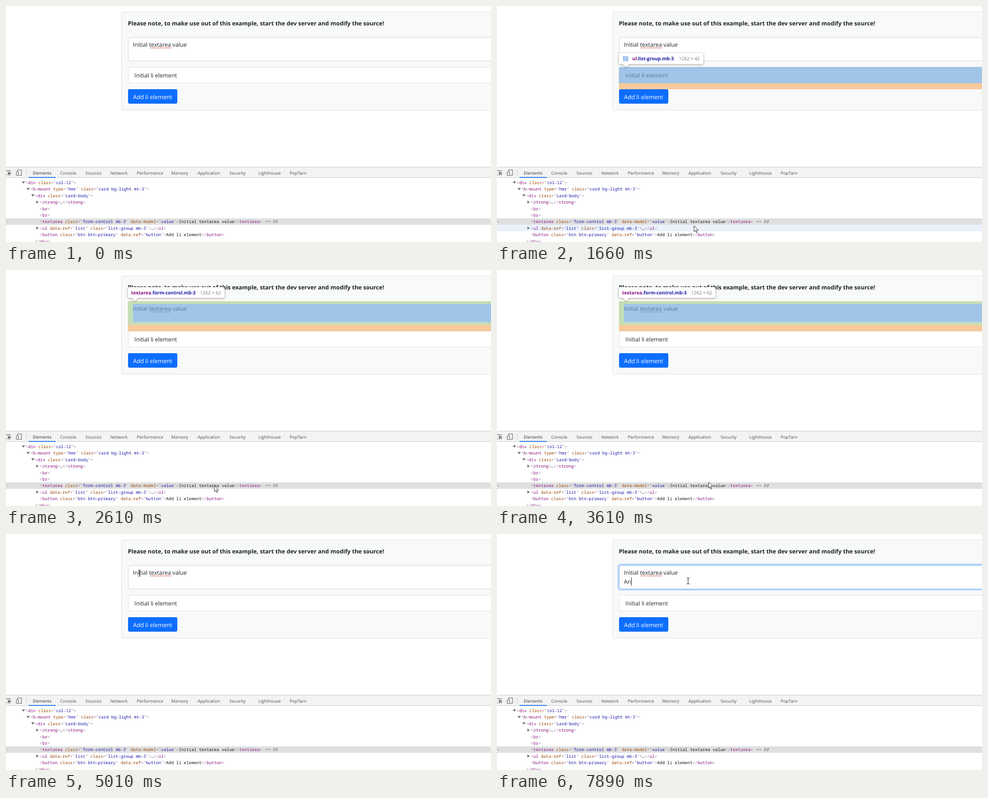
An HTML page that plays this animation: 1073x522 px, repeating every 8000 ms.

```html
<!DOCTYPE html>
<html lang="en">
<head>
<meta charset="utf-8">
<title>Live textarea editing</title>
<style>
  html, body { margin: 0; width: 100%; height: 100%; overflow: hidden; background: #fff; }
  svg { display: block; }
  text { white-space: pre; text-rendering: geometricPrecision; fill: #212529;
    font: 12.7px "Open Sans", "Noto Sans", sans-serif; }
  .head { font-size: 12.78px; font-weight: 700; }
  .btn { font-size: 12.9px; fill: #fff; }
  .tab { font-size: 9.6px; fill: #505050; }
  .tab.on { fill: #333; }
  .code { font: 500 9.32px "Noto Sans Mono", "DejaVu Sans Mono", monospace; fill: #1a1a1a; }
  .tip text { font-size: 10.2px; fill: #777; }
  .tip .sel { font-size: 10.45px; font-weight: 700; fill: #1a1aa6; }
  .tip .box { fill: #fff; filter: drop-shadow(0 1px 2px rgba(0, 0, 0, .4)); }
  .punct { fill: #95789a; }
  .tag { fill: #881280; }
  .attr { fill: #994500; }
  .val { fill: #1a1aa6; }
  .content { fill: rgba(111, 168, 220, .66); }
  .padding { fill: rgba(147, 196, 125, .55); }
  .margin { fill: rgba(246, 178, 107, .66); }
  .edge { fill: none; stroke: rgba(255, 229, 153, .66); }
</style>
</head>
<body>
<svg width="1073" height="522" viewBox="0 0 1073 522">
  <g id="page">
    <rect x="255.5" y="13.5" width="1100" height="217" rx="3.4" fill="#f8faf9" stroke="#dfdfdf"/>
    <text class="head" x="269.5" y="43">Please note, to make use out of this example, start the dev server and modify the source!</text>
    <rect id="ring" x="268.3" y="67.3" width="1100" height="55.9" rx="5" fill="none" stroke="#0d6efd" stroke-width="3.4"/>
    <rect id="area" x="270.5" y="69.5" width="1100" height="52" rx="3.4" fill="#fff" stroke="#ced4da"/>
    <text x="280.6" y="90">Initial textarea value</text>
    <path id="squiggle" fill="none" stroke="#e23c2e"/>
    <text id="typed" x="280.8" y="110.4"></text>
    <rect id="caret" width="1" height="18" fill="#111"/>
    <rect x="270.5" y="135.5" width="1100" height="35" rx="3.4" fill="#fff" stroke="#dfdfdf"/>
    <text x="284.1" y="158">Initial li element</text>
    <rect x="270" y="184" width="109" height="32" rx="3.4" fill="#0d6efd"/>
    <text class="btn" x="281" y="205.5">Add li element</text>
  </g>

  <g id="areaMark">
    <path class="padding" fill-rule="evenodd" d="M270 69H1073V121H270ZM281 75H1073V115.5H281Z"/>
    <rect class="content" x="281" y="75" width="792" height="40.5"/>
    <rect class="edge" x="270" y="69.3" width="1100" height="52"/>
    <rect class="margin" x="269.7" y="121.6" width="804" height="13.6"/>
  </g>
  <g id="listMark">
    <rect class="content" x="269.7" y="135" width="804" height="35.7"/>
    <rect class="margin" x="269.7" y="170.7" width="804" height="13.6"/>
  </g>

  <g id="devtools">
    <rect y="357" width="1073" height="23" fill="#f3f3f3"/>
    <path d="M0 356.5H1073M0 379.5H1073M45 362V376" stroke="#cacdd1"/>
    <rect x="50" y="378.3" width="60" height="1.9" fill="#1a73e8"/>
    <g fill="none" stroke="#6e6e6e" stroke-width="1.2">
      <path d="M0 364.3H9.3V367M0 373.5H3"/>
      <path d="M4 367.3L10.8 370L8 371L10.5 374.2M4 367.3L5.8 374L7.2 371.5" fill="#6e6e6e"/>
      <path d="M25.5 366V362.6H34.3V374.3H28.5"/>
      <rect x="22.6" y="367" width="5" height="7.5"/>
    </g>
    <rect y="469.6" width="1073" height="14.4" fill="#e0e0e0"/>
    <rect id="rowHover" y="484" width="1073" height="14.4" fill="#ebf2fc"/>
    <path d="M0 477H2.5" stroke="#777" stroke-width="1.2"/>
  </g>

  <g id="arrow"><path d="M0 0V13.2L3 10.5L5 15.3L7 14.4L5 9.8H9.3Z" fill="#fff" stroke="#111" stroke-width=".9"/></g>
  <g id="beam"><path d="M-3-6.5H-1L0-5.7L1-6.5H3M0-6V6M-3 6.5H-1L0 5.7L1 6.5H3" fill="none" stroke="#222" stroke-width="1.1"/></g>
</svg>
<script>
const LOOP = 8000;
const $ = id => document.getElementById(id);
const add = (id, html) => $(id).insertAdjacentHTML('beforeend', html);
const show = (id, on) => $(id).style.display = on ? '' : 'none';
const span = (cls, s) => `<tspan class="${cls}">${s.replace('<', '&lt;')}</tspan>`;

// Spelling underline
let wave = 'M317.5 92';
for (let i = 1; i <= 24; i++) wave += `L${317.5 + i * 2} ${i % 2 ? 93.5 : 92}`;
$('squiggle').setAttribute('d', wave);

// Inspector tooltips
const tip = (y, w, h, tag, cls, size, x, sizeX, icon = '') => `<g class="tip">
  <path class="box" d="M272.5 ${y}h${w - 6}q3 0 3 3v${h - 6}q0 3-3 3H292.5l-7 7l-7-7h-6q-3 0-3-3v${6 - h}q0-3 3-3Z"/>${icon}
  <text class="sel" x="${x}" y="${y + 16.4}">${span('tag', tag)}${cls}</text>
  <text x="${sizeX}" y="${y + 16.4}">${size}</text></g>`;
const grid = [[279.5, 112, 3.5], [285.5, 112, 4], [279.5, 117.5, 4], [286, 117.5, 3.5]]
  .map(([x, y, w]) => `<rect x="${x}" y="${y}" width="${w}" height="3.6" fill="none" stroke="#3b82e0"/>`).join('');
add('areaMark', tip(37.7, 214, 24, 'textarea', '.form-control.mb-3', '1262 × 62', 276.8, 429.5));
add('listMark', tip(104, 187, 24.5, 'ul', '.list-group.mb-3', '1262 × 42', 299.3, 402.5, grid));

// Inspector tabs
[['Elements', 59.5], ['Console', 119.8], ['Sources', 175.8], ['Network', 230.8], ['Performance', 289.4],
 ['Memory', 365.6], ['Application', 423.7], ['Security', 494.5], ['Lighthouse', 558.3], ['PopTarn', 627.5]]
  .forEach(([name, x], i) => add('devtools', `<text class="tab ${i ? '' : 'on'}" x="${x}" y="372.8">${name}</text>`));

// Markup tree: indent level, fold marker, source line
const paint = line => line.replace(/(<\/?)([\w-]+)([^>]*)>/g, (_, open, tag, attrs) =>
  span('punct', open) + span('tag', tag) +
  attrs.replace(/([\w-]+)="([^"]*)"/g, (_, n, v) => span('attr', n) + span('punct', '="') + span('val', v) + span('punct', '"')) +
  span('punct', '>'));
const fold = { v: 'M-8.5-6h7l-3.5 5z', '>': 'M-7.5-7v7l5-3.5z', '': '' };
[[0, 'v', '<div class="col-12">'],
 [1, 'v', '<b-mount type="hmr" class="card bg-light mt-3">'],
 [2, 'v', '<div class="card-body">'],
 [3, '>', '<strong>…</strong>'],
 [3, '', '<br>'],
 [3, '', '<br>'],
 [3, '', '<textarea class="form-control mb-3" data-model="value">Initial textarea value</textarea>'],
 [3, '>', '<ul data-ref="list" class="list-group mb-3">…</ul>'],
 [3, '', '<button class="btn btn-primary" data-ref="button">Add li element</button>'],
 [2, '', '</div>']].forEach(([level, mark, line], i) => add('devtools',
  `<g transform="translate(${43.6 + level * 10.4} ${394 + i * 14.4})">
   <path d="${fold[mark]}" fill="#6e6e6e"/><text class="code">${paint(line)}</text></g>`));
add('devtools', '<text class="code" x="572.8" y="480.4" style="fill:#777;font-style:italic">== $0</text>');

// Pointer moves: start, end, step count, then [step, x, y] keys
const moves = [
  [1020, 1760, 9, [[0, 474, 517], [7, 436, 486], [8, 430.5, 482]]],
  [1860, 2610, 9, [[0, 424, 480], [3, 405, 475], [8, 461, 477]]],
  [2690, 3250, 7, [[0, 440, 476], [3, 346, 474], [6, 477, 475]]],
  [3610, 4350, 9, [[0, 468, 469], [1, 456, 385], [4, 420, 180], [8, 396, 73]]],
  [4530, 5010, 6, [[0, 375, 75], [3, 277, 83], [5, 295.3, 86.5]]],
  [5190, 5270, 2, [[0, 360, 88], [1, 437, 91]]],
  [5550, 6120, 7, [[0, 432, 96], [2, 424, 102], [6, 422.8, 104]]]
];

function pointer(t) {
  const move = moves.filter(m => m[0] <= t).pop();
  if (!move) return null;
  const [start, end, count, keys] = move;
  const gap = (end - start) / (count - 1);
  const step = Math.min(count - 1, Math.floor((t - start) / gap + .15));
  const j = Math.max(1, keys.findIndex(k => k[0] >= step));
  const [a, b] = [keys[j - 1], keys[j]];
  const f = (step - a[0]) / (b[0] - a[0]);
  return [a[1] + (b[1] - a[1]) * f, a[2] + (b[2] - a[2]) * f];
}

const FOCUS = 5740;
const caretOff = [[0, FOCUS], [6300, 6860], [7690, 7790]];

function draw(t) {
  const p = pointer(t);
  const inArea = p && p[1] > 66 && p[1] < 121;
  show('arrow', p && !inArea);
  show('beam', inArea);
  if (p) $(inArea ? 'beam' : 'arrow').setAttribute('transform', `translate(${p})`);

  const overList = p && p[1] >= 484 && p[1] < 498.4;
  show('rowHover', overList);
  show('listMark', overList);
  show('areaMark', p && p[1] >= 468 && p[1] < 484);

  const focus = Math.min(1, Math.max(0, (t - FOCUS) / 150));
  $('ring').setAttribute('opacity', focus * .25);
  $('area').setAttribute('stroke', focus > .5 ? '#86b7fe' : '#ced4da');

  const typed = t < 7790 ? '' : t < 7890 ? 'A' : 'An';
  if ($('typed').textContent !== typed) $('typed').textContent = typed;
  show('caret', !caretOff.some(([from, to]) => t >= from && t < to));
  const second = t >= 7140;
  $('caret').setAttribute('x', second ? Math.round(281 + typed.length * 7.9) : 400);
  $('caret').setAttribute('y', second ? 96 : 75);
}

const begin = performance.now();
function tick() {
  draw((performance.now() - begin) % LOOP);
  requestAnimationFrame(tick);
}
tick();
</script>
</body>
</html>
```
